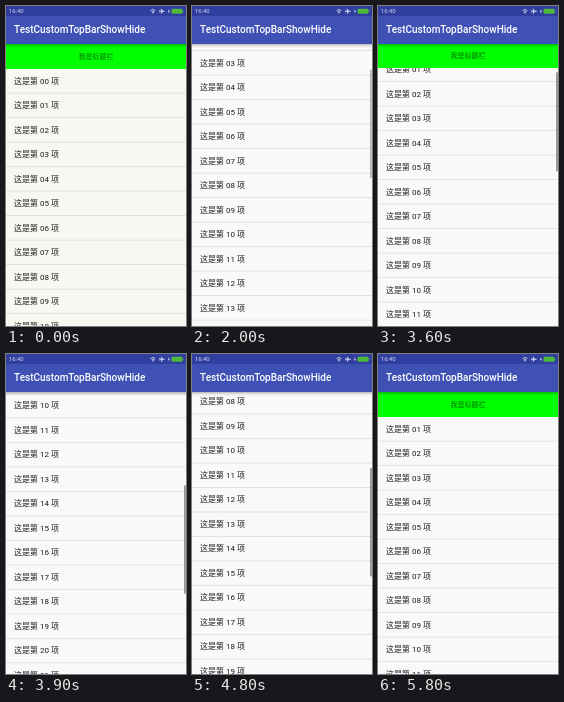
Write an HTML page with a canvas that moves like this. It is 180 px wide and 320 px high and loops after 7900 ms.

```html
<!DOCTYPE html>
<html lang="zh-CN">
<head>
<meta charset="utf-8">
<title>TestCustomTopBarShowHide</title>
<style>
html, body { margin: 0; width: 100%; height: 100%; overflow: hidden; background: #f9f9f9; }
canvas { display: block; width: 180px; height: 320px; }
</style>
</head>
<body>
<canvas id="stage"></canvas>
<script>
const W = 180, H = 320, LOOP = 7900, STEP = 100;
const TOP = 38, BAR = 25, ROW = 24.5, ITEMS = 30;
const FONT = 'Roboto, "Noto Sans CJK SC", "Noto Sans CJK", sans-serif';
const PALE = '#d5d9ee', GREEN = '#4db83a';
const SLIDE = 300, FADE = 300, GLOW_START = 5100, GLOW_TIME = 400;

// Drags and flings; each starts where the previous one stopped
const MOVES = [
  { start: 1000, end: 1600, to: 91.5, power: 1.88 },
  { start: 2300, end: 3000, to: 36, power: 1.5 },
  { start: 3600, end: 4300, to: 321.5, power: 3 },
  { start: 4300, end: 4500, to: 305, power: 1 },
  { start: 4700, end: 5100, to: ROW, power: 1.2 }
];

// Title bar animations
const SLIDES = [
  { start: 1046, appear: false },
  { start: 2450, appear: true },
  { start: 3560, appear: false },
  { start: 4930, appear: true }
];

const canvas = document.getElementById('stage');
const ctx = canvas.getContext('2d');
const ratio = window.devicePixelRatio || 1;
canvas.width = W * ratio;
canvas.height = H * ratio;
ctx.scale(ratio, ratio);

const clamp = v => Math.max(0, Math.min(1, v));
const easeOut = (k, power) => 1 - (1 - k) ** power;
const easeInOut = k => (1 - Math.cos(Math.PI * k)) / 2;

function scrollAt(t) {
  return MOVES.reduce((pos, { start, end, to, power }) =>
    pos + (to - pos) * easeOut(clamp((t - start) / (end - start)), power), 0);
}

function thumbAlpha(t) {
  const awake = (from, until) => t < from ? 0 : 1 - clamp((t - until) / FADE);
  return Math.max(awake(1100, 1900), awake(2400, 5500)) * (t < 1100 ? 0 : 1);
}

function barState(t) {
  let shown = 1, listTop = TOP + BAR;
  for (const { start, appear } of SLIDES) {
    if (t < start) break;
    const k = clamp((t - start) / SLIDE);
    shown = appear ? easeInOut(k) : 1 - easeInOut(k);
    // The list keeps its full height until the bar has arrived
    listTop = appear && k < 1 ? TOP : TOP + BAR * shown;
  }
  return { y: TOP - BAR * (1 - shown), listTop };
}

function rect(x, y, w, h, fill) {
  ctx.fillStyle = fill;
  ctx.fillRect(x, y, w, h);
}

function text(str, x, y, font, fill, align = 'left') {
  ctx.font = font + ' ' + FONT;
  ctx.fillStyle = fill;
  ctx.textAlign = align;
  ctx.fillText(str, x, y);
}

function drawBar(y) {
  rect(0, y, W, BAR, '#00ff00');
  text('我是标题栏', 90, y + 14.8, '7px', 'rgba(0,0,0,.56)', 'center');
}

function drawList(t, listTop) {
  const scroll = scrollAt(t);
  ctx.save();
  ctx.beginPath();
  ctx.rect(0, listTop, W, H - listTop);
  ctx.clip();
  for (let i = 0; i < ITEMS; i++) {
    const y = TOP + BAR + ROW * i - scroll;
    text('这是第 ' + String(i).padStart(2, '0') + ' 项', 8, y + 14.6, '8px', '#1c1c1c');
    rect(0, y + 23.75, W, .75, 'rgba(0,0,0,.12)');
  }
  ctx.restore();

  const part = (H - TOP) / (ITEMS * ROW);
  const y = listTop + part * Math.max(0, scroll - ROW);
  rect(178, y, 2, (H - listTop) * part, `rgba(0,0,0,${.38 * thumbAlpha(t)})`);
}

function drawGlow(t) {
  if (t < GLOW_START) return;
  const k = 1 - clamp((t - GLOW_START) / GLOW_TIME);
  ctx.fillStyle = `rgba(63,81,181,${.42 * k})`;
  ctx.beginPath();
  ctx.moveTo(0, TOP);
  ctx.lineTo(0, TOP + 15 * k);
  ctx.quadraticCurveTo(W / 2, TOP + 53 * k, W, TOP + 15 * k);
  ctx.lineTo(W, TOP);
  ctx.fill();
}

function drawWifi(x, y) {
  ctx.strokeStyle = PALE;
  ctx.lineWidth = .9;
  for (const r of [1.7, 3.4]) {
    ctx.beginPath();
    ctx.arc(x, y, r, -Math.PI * .76, -Math.PI * .24);
    ctx.stroke();
  }
  ctx.fillStyle = PALE;
  ctx.beginPath();
  ctx.arc(x, y - .2, .8, 0, 7);
  ctx.fill();
}

function drawPath(d) {
  ctx.fillStyle = PALE;
  ctx.fill(new Path2D(d));
}

function drawHeader() {
  const shade = ctx.createLinearGradient(0, TOP, 0, TOP + 4);
  shade.addColorStop(0, 'rgba(0,0,0,.28)');
  shade.addColorStop(.4, 'rgba(0,0,0,.11)');
  shade.addColorStop(1, 'rgba(0,0,0,0)');
  rect(0, TOP, W, 4, shade);

  rect(0, 0, W, TOP, '#3f51b5');
  rect(0, 0, W, 10, '#303f9f');
  text('TestCustomTopBarShowHide', 8, 27.3, '500 10px', '#fff');

  text('16:40', 2.8, 7.3, '6px', PALE);
  drawWifi(147, 7);
  // Plane, then charging bolt
  drawPath('M159 5.2l-.7 -.5h-1.4l-1.4 -2h-.8l.7 2h-1.1l-.6 -.7h-.5l.3 1.2l-.3 1.2h.5l.6 -.7h1.1l-.7 2h.8l1.4 -2h1.4z');
  drawPath('M163.2 2.8l-1.3 2.9h1l-.4 2.1l1.5 -2.9h-1z');
  ctx.fillStyle = GREEN;
  ctx.beginPath();
  ctx.roundRect(165.5, 2.8, 11, 5, 1.4);
  ctx.fill();
  rect(176.5, 4.3, .8, 2, GREEN);
}

function draw(t) {
  rect(0, 0, W, H, t < 1100 ? '#f8f7f2' : '#f9f9f9');
  const { y, listTop } = barState(t);
  drawBar(y);
  drawList(t, listTop);
  drawGlow(t);
  drawHeader();
}

const begin = performance.now();
function tick() {
  const t = (performance.now() - begin) % LOOP;
  draw(Math.floor(t / STEP) * STEP);
  requestAnimationFrame(tick);
}
tick();
</script>
</body>
</html>
```
